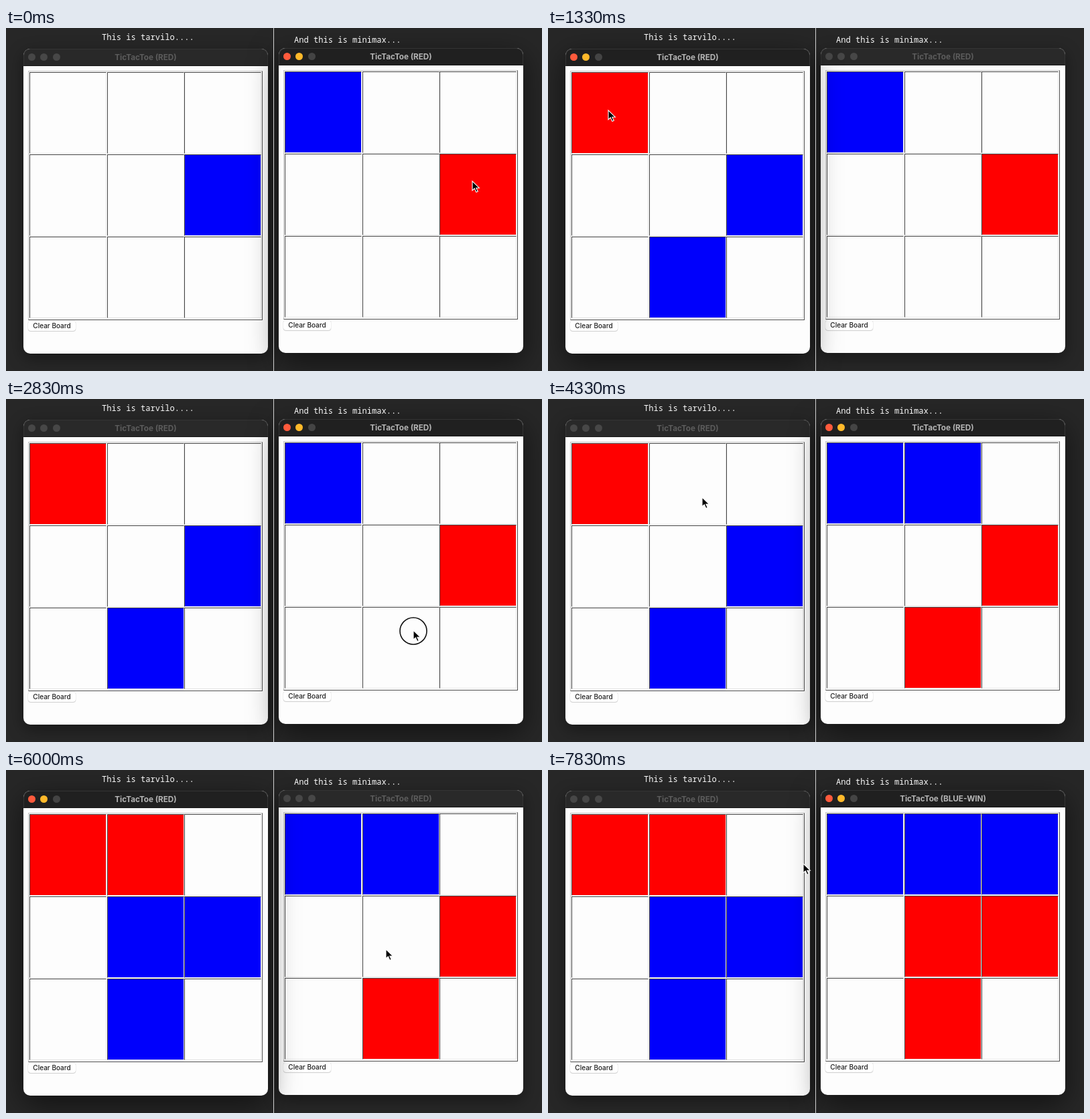
These frames come from a looping animation (800x513 px, 8000 ms). An HTML page:

```html
<!DOCTYPE html>
<html lang="en">
<head>
<meta charset="utf-8">
<title>Tic-tac-toe</title>
<style>
* { box-sizing: border-box; }
html, body { margin: 0; width: 100%; height: 100%; overflow: hidden; background: #272727; }
#stage { position: relative; width: 800px; height: 513px; overflow: hidden; font-family: Inter, sans-serif; }
#stage div, svg { position: absolute; }
.label { font: 12.08px/16px "Noto Sans Mono", monospace; color: #fafafa; white-space: pre; z-index: 4; }
.divider { left: 399px; top: 0; width: 1px; height: 513px; background: #d2d2d2; z-index: 3; }
.win { width: 365px; height: 456px; border-radius: 10px; background: #fdfdfd; z-index: 1;
  box-shadow: 0 7px 24px rgba(0,0,0,.4); }
.bar { width: 100%; height: 26px; border-radius: 10px 10px 0 0; background: #292929; border: 1px solid #343434;
  border-bottom-color: #1a1a1a; font: 700 11.7px/24px Inter, sans-serif; text-align: center; color: #5c5c5c; }
.light { top: 6px; width: 11px; height: 11px; border-radius: 50%; background: #474747; }
.active { z-index: 2; box-shadow: 0 12px 44px rgba(0,0,0,.55); }
.active .bar { background: #202020; color: #b5b5b5; }
.active .l0 { background: #ff5a3c; }
.active .l1 { background: #ffb92a; }
.active .l2 { background: #444; }
.table { left: 7px; top: 33px; width: 350px; height: 373px; border: 1px solid;
  border-color: #c4c4c4 #505050 #505050 #c4c4c4; }
.cell { width: 115px; height: 122px; border: 1px solid; border-color: #444 #e6e6e6 #e6e6e6 #444;
  background-clip: padding-box; }
.button { left: 7px; top: 407px; width: 71px; height: 15px; border-radius: 4px; background: #fff;
  box-shadow: 0 0 1px #a5a5a5, 0 1px 1px #d2d2d2; font: 500 10px/15px Inter, sans-serif; text-align: center; color: #1d1d1d; }
svg { left: 0; top: 0; z-index: 5; }
</style>
</head>
<body>
<div id="stage">
  <div class="label" style="left:143px;top:6px">This is tarvilo....</div>
  <div class="label" style="left:430px;top:10px">And this is minimax...</div>
  <div class="divider"></div>
  <svg width="800" height="513">
    <g id="pointer">
      <g id="ring" fill="none">
        <circle cy="1" r="20" stroke="#fff" stroke-opacity=".35" stroke-width="3"/>
        <circle cy="1" r="20" stroke="#101010" stroke-width="1.6"/>
      </g>
      <path d="M0 0V14L3.3 11L5.8 16.5L8.3 15.4L5.8 10.2H10.3Z" fill="#000" stroke="#fff" stroke-width="1.1"/>
    </g>
  </svg>
</div>
<script>
const LOOP = 8000, STEP = 1000 / 6;
const RED = '#ff0000', BLUE = '#0000fc';
const $ = id => document.getElementById(id);

// Moves: [step, cell, colour]
const games = [
  { x: 26, y: 31, moves: [[0, 5, BLUE], [7, 0, RED], [7, 7, BLUE], [29, 1, RED], [29, 4, BLUE]] },
  { x: 407, y: 30, winAt: 39,
    moves: [[0, 0, BLUE], [0, 5, RED], [18, 7, RED], [18, 1, BLUE], [39, 4, RED], [39, 2, BLUE]] }
];
// Pointer stops: [step, x, y]
const path = [
  [0, 696, 229], [1, 696, 229], [5, 90, 123], [11, 90, 123], [15, 608, 346], [23, 608, 346],
  [26, 230, 147], [32, 230, 147], [36, 567, 268], [38, 575, 268], [39, 575, 268],
  [41, 564, 266], [46, 564, 266], [47, 381, 140]
];
const clicks = [5, 7, 15, 17, 27, 29, 37, 39];
const focusChanges = [5, 15, 27, 37];

function add(parent, name, left, top) {
  const el = document.createElement('div');
  el.className = name;
  if (left !== undefined) el.style.left = left + 'px';
  if (top !== undefined) el.style.top = top + 'px';
  return parent.appendChild(el);
}

for (const game of games) {
  game.el = add($('stage'), 'win', game.x, game.y);
  const bar = add(game.el, 'bar');
  game.title = bar.appendChild(document.createElement('span'));
  for (let i = 0; i < 3; i++) add(bar, 'light l' + i, 6 + i * 18.3);
  const table = add(game.el, 'table');
  game.cells = Array.from({ length: 9 }, (_, i) =>
    add(table, 'cell', 1 + Math.round(i % 3 * 115.7), 1 + Math.floor(i / 3) * 123));
  add(game.el, 'button').textContent = 'Clear Board';
}

function pointerAt(step) {
  const next = path.findIndex(p => p[0] > step);
  if (next < 0) return path[path.length - 1].slice(1);
  const [t0, x0, y0] = path[next - 1], [t1, x1, y1] = path[next];
  const u = (step - t0) / (t1 - t0), k = u * u * (3 - 2 * u);
  return [x0 + (x1 - x0) * k, y0 + (y1 - y0) * k];
}

function draw(now) {
  const step = Math.floor((now % LOOP + 5) / STEP) % 48;
  const focused = (focusChanges.filter(s => s <= step).length + 1) % 2;
  games.forEach((game, i) => {
    game.el.classList.toggle('active', i === focused);
    game.title.textContent = `TicTacToe (${step >= game.winAt ? 'BLUE-WIN' : 'RED'})`;
    for (const [from, cell, colour] of game.moves)
      game.cells[cell].style.backgroundColor = step >= from ? colour : '';
  });
  $('pointer').setAttribute('transform', `translate(${pointerAt(step)})`);
  $('ring').style.display = clicks.includes(step) ? '' : 'none';
}

const start = performance.now();
function tick() {
  draw(performance.now() - start);
  requestAnimationFrame(tick);
}
tick();
</script>
</body>
</html>
```
